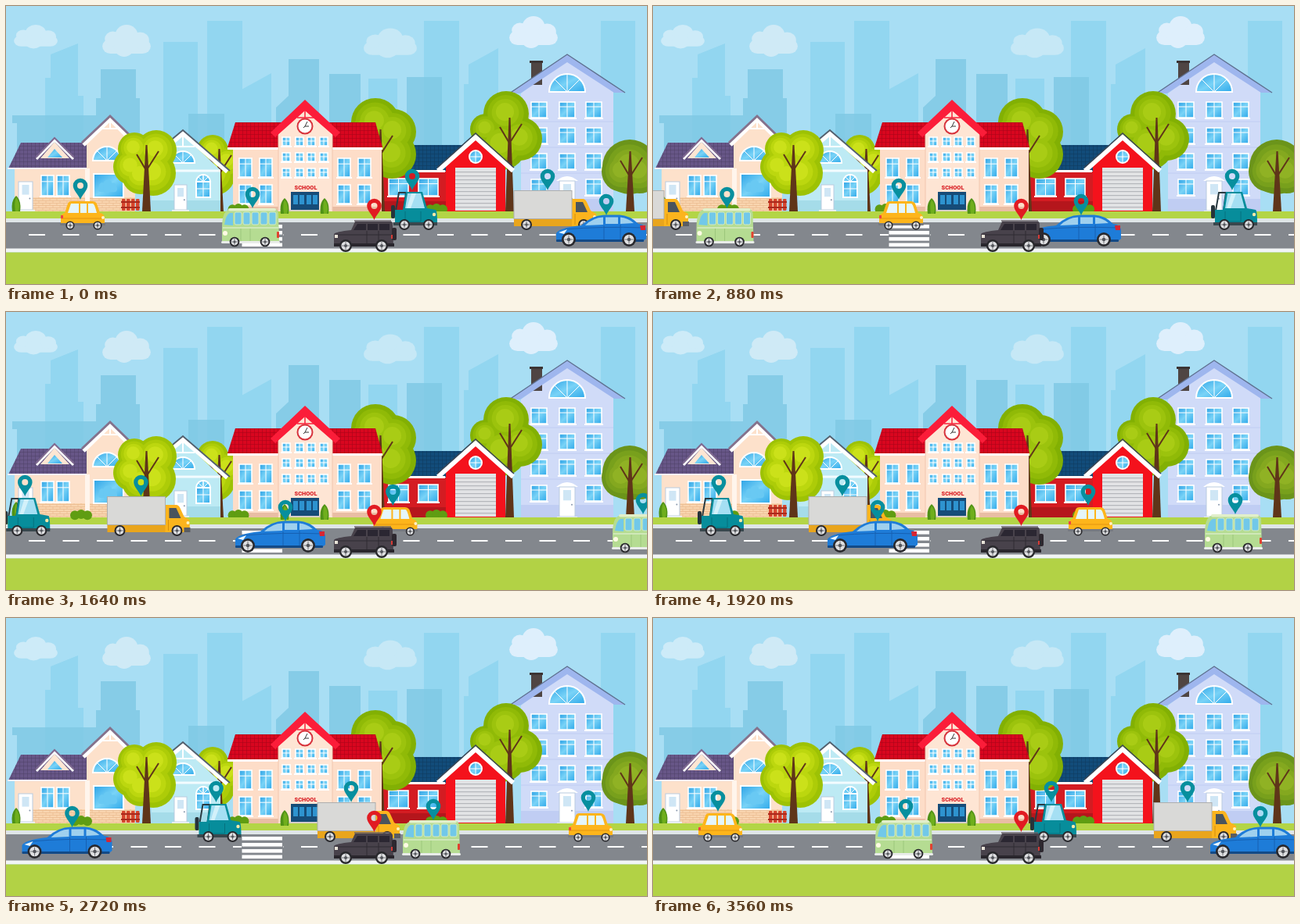
Recreate the animation shown at these times as an HTML page. Size 819 by 356 pixels, loop 3600 ms.

```html
<!DOCTYPE html>
<html lang="en">
<head>
<meta charset="utf-8">
<title>Town street</title>
<style>
html, body { margin: 0; width: 100%; height: 100%; overflow: hidden; background: #a8ddf3 }
svg { display: block; width: 819px; height: 356px }
text { font: 900 7.4px Roboto, sans-serif }
</style>
</head>
<body>
<svg id="stage" viewBox="0 0 819 356">
<defs>
  <linearGradient id="glass" x2="1" y2="1"><stop stop-color="#2ea3e6"/><stop offset=".5" stop-color="#79d3f7"/><stop offset="1" stop-color="#2fa9ea"/></linearGradient>
  <pattern id="tiles" width="5" height="5" patternUnits="userSpaceOnUse"><path d="M0 4.5H5M2.5 0V4.5" stroke="#000" stroke-opacity=".13" fill="none"/></pattern>
  <pattern id="bricks" width="9" height="6" patternUnits="userSpaceOnUse"><path d="M0 .5H9M0 3.5H9M2 0V3M6 3V6" stroke="#e9b98c" stroke-width=".7" fill="none"/></pattern>
</defs>
</svg>
<script>
const stage = document.getElementById('stage');

const rect = (x, y, w, h, fill, more = '') => `<rect x="${x}" y="${y}" width="${w}" height="${h}" fill="${fill}" ${more}/>`;
const path = (d, fill, more = '') => `<path d="${d}" fill="${fill}" ${more}/>`;
const line = (d, color, width = 1, more = '') => path(d, 'none', `stroke="${color}" stroke-width="${width}" ${more}`);
const ball = (x, y, r, fill, ry = r) => `<ellipse cx="${x}" cy="${y}" rx="${r}" ry="${ry}" fill="${fill}"/>`;
const grid = (xs, ys, draw) => ys.map(y => xs.map(x => draw(x, y)).join('')).join('');

// Window with a white frame, a middle bar and a sill
const pane = (x, y, w, h, bar = .3) =>
  rect(x, y, w, h, 'url(#glass)', 'stroke="#fff" stroke-width="1.6"') +
  line(`M${x + w / 2} ${y}v${h}M${x} ${y + h * bar}h${w}`, '#fff') +
  rect(x - 2, y + h, w + 4, 2, '#fff');
const arch = (x, y, r) =>
  path(`M${x - r} ${y}a${r} ${r} 0 0 1 ${2 * r} 0z`, 'url(#glass)', 'stroke="#fff" stroke-width="2"') +
  line(`M${x} ${y - r}v${r}M${x} ${y}l${-r * .7} ${-r * .7}M${x} ${y}l${r * .7} ${-r * .7}`, '#fff');
const door = (x, y, w, h) =>
  rect(x, y, w, h, '#fff', 'stroke="#b9cbe0"') + rect(x + w * .25, y + 4, w * .5, h * .35, '#cfe6f5') +
  ball(x + w * .8, y + h * .6, 1, '#8797ad') + rect(x - 3, y + h, w + 6, 2, '#e9eef3');

const cloud = (x, y, sx, sy, fill) => `<g transform="translate(${x} ${y}) scale(${sx} ${sy})" fill="${fill}">
  <rect x="-30" y="-2" width="60" height="20" rx="10"/><circle cx="-17" cy="-2" r="10"/>
  <circle cx="0" cy="-7" r="14"/><circle cx="17" cy="0" r="11"/><circle cx="-3" cy="10" r="12"/></g>`;

// Crown of merging lobes, shaded from the rim inwards
const lime = ['#9dc204', '#adcc08', '#bcd70f', '#cbe11a'];
const leaf = ['#82b003', '#90ba07', '#9cc30d', '#a9cc15'];
const olive = ['#6b941a', '#78a01c', '#84a81f', '#90b224'];
const tree = (lobes, shades, trunk, fork) =>
  shades.map((shade, i) => lobes.map(([x, y, r]) => ball(x - i * .5, y - i * .8, r * (1 - i * .2), shade)).join('')).join('') +
  path(`M${trunk - 6} 263L${trunk - 1.5} ${fork - 22}h2L${trunk + 5} 263z`, '#5f3519') +
  line(`M${trunk} ${fork + 12}L${trunk - 13} ${fork - 10}M${trunk + 1} ${fork + 8}L${trunk + 15} ${fork - 14}`, '#5f3519', 2);
const bush = (x, w, y = 263) => [-.32, 0, .32].map(k => ball(x + k * w, y - 4 + Math.abs(k) * 4, w * .24, '#5f9d12', 6)).join('');
const shrub = (x, y) => path(`M${x - 5} ${y}q-2 -14 5 -20q7 6 5 20z`, '#4f9216') + path(`M${x - 1} ${y}q-2 -12 1 -18q6 7 3 18z`, '#6fae1d');

const backdrop = () =>
  rect(0, 0, 819, 265, '#a8def4') +
  path('M57 62L92 48V115H99V220H50V92H57zM201 46h44v180h-44zM257 19h45v200h-45zM290 113L339 86V220H290zM463 93h37v120h-37zM534 19h45v190h-45zM591 75L629 54V220H585V100H591zM760 19h44v200h-44z', '#92d6f0') +
  path('M8 140H123V150H117V220H14V150H8zM121 81h45v37h5v100h-56V118h6zM233 138h46v80h-46zM361 68h39v150h-55V130L361 115zM413 87h40v130h-40zM512 91h45v120h-45z', '#7fc9e4', 'opacity=".8"') +
  cloud(38, 39, .93, .71, '#cdebf8') + cloud(154, 44, 1.03, .95, '#cfeaf6') + cloud(491, 47, 1.13, .88, '#c6e8f6') + cloud(674, 33, 1.03, .95, '#deeffc');

const cottage = () =>
  rect(11, 207, 92, 56, '#fde1cb') + rect(11, 245, 154, 18, '#f9d5b0') + rect(11, 245, 154, 18, 'url(#bricks)') +
  path('M19 175H130L106 208H3z', '#675687') + path('M19 175H130L106 208H3z', 'url(#tiles)') + line('M2 208H106', '#f4eef4', 2) +
  path('M44 195L62 174L81 195z', '#fde6d3') + path('M53 194L62 183L72 194z', 'url(#glass)') +
  line('M39 196L62 172L86 196', '#fff', 3) + line('M38 194L62 169L87 194', '#806a91', 2) +
  path('M103 175L133 145L165 178V245H103z', '#fde1cb') +
  line('M99 178L133 145L168 180', '#fff', 5) + line('M97 175L133 141L170 177', '#85728c', 3) +
  line('M121 157H145M133 145V157', '#fff', 2) + arch(129, 198, 18) +
  rect(112, 215, 38, 30, 'url(#glass)', 'stroke="#fff" stroke-width="2"') + cloud(130, 231, .4, .4, '#69c9f3') +
  rect(101, 208, 6, 54, '#fff5ec') + door(16, 225, 18, 36) + pane(45, 217, 16, 26) + pane(65, 217, 16, 26) + shrub(13, 263) +
  grid([148, 154, 160, 166], [247], (x, y) => rect(x, y, 4.5, 15, '#d6452d', 'rx="1"')) + line('M147 251H171M147 258H171', '#a92a1d', 2);

const blueHouse = () =>
  path('M186 195L226 165L274 210V263H186z', '#bdeaf4') + rect(186, 249, 88, 14, '#a5dce9') +
  line('M178 204L226 163L283 212', '#fff', 6) + line('M178 199L226 159L286 211', '#53606e', 2) +
  line('M209 180H241M226 165V180', '#fff', 2) + arch(226, 201, 15) + line('M186 211H274', '#f3fcff', 3) + door(215, 229, 16, 32) +
  rect(243, 225, 18, 20, 'url(#glass)', 'stroke="#fff" stroke-width="2"') + arch(252, 225, 9) + line('M252 217v28M243 234h18', '#fff');

const school = () =>
  rect(290, 183, 190, 80, '#fdddc8') + rect(290, 257, 190, 6, '#e9bda4') +
  path('M293 149H472L481 181H283z', '#d9061f') + path('M293 149H472L481 181H283z', 'url(#tiles)') + rect(283, 181, 198, 3, '#fff') +
  path('M348 163L382 130L417 163V263H348z', '#fee5d4') + line('M348 165V262M417 165V262', '#f1c6ae') +
  path('M382 120L427 162L421 168L382 134L344 168L338 162z', '#fb1d39') + line('M372 143H393M382 134V143', '#fb1d39', 1.5) +
  ball(382, 154, 10.5, '#d7333c') + ball(382, 154, 8.5, '#fff') + line('M385 148L382 154H387M382 154L380 156', '#333') +
  grid([353, 370, 385, 401], [168, 188, 208], (x, y) => pane(x, y, 10, 11, .45)) +
  grid([298, 324, 424, 450], [195, 229], (x, y) => pane(x, y, 16, 24)) +
  '<text x="383" y="235" text-anchor="middle" fill="#d91e24">SCHOOL</text>' +
  rect(364, 238, 36, 24, '#164c78') + grid([367, 375, 384, 392], [242], (x, y) => rect(x, y, 6, 12, '#2e93cf')) + rect(361, 261, 42, 2, '#d8cfca') + bush(297, 24);

const flats = () =>
  path('M658 112L717 66L776 110V263H658z', '#d0dbf8') + rect(658, 247, 118, 16, '#c0cdf3') + rect(671, 73, 14, 28, '#4f4543') + rect(669, 70, 17, 3, '#3b3433') +
  path('M717 62L790 111H777L717 72L657 112H643z', '#9eb6ee') + line('M643 112L717 62L791 111', '#5f7190', 1.4) +
  arch(717, 110, 23) + line('M658 148H776M658 181H776M658 214H776', '#c0cdf2') +
  grid([671, 707, 741], [123, 156, 189], (x, y) => pane(x, y, 20, 20)) + pane(671, 222, 20, 20) + pane(741, 222, 20, 20) +
  path('M703 224Q717 212 731 224z', '#fff') + door(707, 224, 20, 38);

const fireHouse = () =>
  rect(482, 212, 82, 51, '#d41c22') + rect(482, 250, 82, 13, '#b5161c') +
  path('M498 178H592L563 211H481z', '#124c7a') + path('M498 178H592L563 211H481z', 'url(#tiles)') + rect(481, 210, 80, 3, '#fff') +
  pane(489, 221, 25, 22) + pane(527, 221, 25, 22);
const garage = () =>
  path('M562 202L600 167L638 202V263H562z', '#f4121c') + line('M552 211L600 168L648 211', '#fff', 6) + line('M551 207L600 163L649 207', '#3b4654', 1.6) +
  ball(600, 193, 9, '#fff') + ball(600, 193, 7, 'url(#glass)') + line('M600 186v14M593 193h14', '#fff') +
  rect(574, 207, 52, 55, '#e2e3e5') + grid([574], [212, 217, 222, 227, 232, 237, 242, 247, 252, 257], (x, y) => rect(x, y, 52, 1.2, '#b4b6bb')) + bush(550, 25);

const road = () =>
  rect(0, 263, 819, 10, '#b3d546') + rect(0, 272, 819, 5, '#dfe5e8') + rect(0, 277, 819, 34, '#83878d') +
  line('M29 293H819', '#fff', 1.8, 'stroke-dasharray="21 22.5"') + rect(301, 278, 53, 32, '#83878d') +
  grid([301.5], [280, 288, 296, 303.5], (x, y) => rect(x, y, 51.5, 4.6, '#fff')) +
  rect(0, 310.5, 819, 5, '#f1f4f5') + rect(0, 315.5, 819, 41, '#b2d245') + bush(96, 25) + shrub(356, 266) + shrub(407, 266);

const wheel = (x, y, r) => ball(x, y, r, '#29292d') + ball(x, y, r * .7, '#dfe0e2') + ball(x, y, r * .25, '#54565c') +
  line(`M${x - r * .6} ${y}h${r * 1.2}M${x} ${y - r * .6}v${r * 1.2}`, '#54565c', .8);
const pin = (x, y, fill = '#078f9e') =>
  path(`M${x} ${y + 18}C${x - 2} ${y + 12} ${x - 9.3} ${y + 6} ${x - 9.3} ${y}a9.3 9.3 0 0 1 18.6 0C${x + 9.3} ${y + 6} ${x + 2} ${y + 12} ${x} ${y + 18}zM${x - 4} ${y}a4 4 0 1 0 8 0a4 4 0 1 0 -8 0z`, fill, 'fill-rule="evenodd"');

const taxi = () =>
  path('M70 281V272Q70 266 75 265L79 253Q80 250 84 250H110Q114 250 116 253L120 265Q126 266 126 272V281z', '#fdb51b') +
  path('M79 265L83 253H93V265zM95 253H103V265H95zM105 253H111Q113 253 116 265H105z', '#e5f6fb') +
  line('M71 272H126', '#e49510') + rect(69, 278, 58, 3, '#777a80', 'rx="1"') + rect(70, 268, 3, 4, '#e44') + ball(124, 271, 2, '#fff3c4') +
  wheel(82, 281, 5.6) + wheel(117, 281, 5.6) + pin(95, 230);

const truck = () =>
  rect(649, 272, 105, 10, '#e9a51c') + path('M723 247H737Q740 247 742 251L747 262L754 266V282H723z', '#fbb41d') +
  path('M728 251H737L743 264H728z', '#4a545d') + rect(649, 236.5, 74, 36, '#d9d9d7', 'stroke="#adaeae"') +
  rect(747, 276, 8, 6, '#5a5d62') + ball(752, 270, 2, '#fff4bf') + line('M727 266V280', '#d58e0d') + wheel(665, 280, 7) + wheel(738, 280, 7) + pin(692, 218);

const jeep = () =>
  rect(492, 255, 5, 17, '#26343a', 'rx="2"') + line('M498 262L502 239H511L508 262', '#2a3b42', 2) +
  path('M497 280V261H507L511 238H532L538 259L549 261Q551 262 551 279z', '#078d9b') +
  path('M513 240H530L535 259H510z', '#a5dff3') + path('M518 240h6l-7 19h-5z', '#d3f1fa') +
  line('M510 263V276H530V263', '#06717e') + rect(495, 277, 56, 4, '#39474d') + ball(547, 267, 2.2, '#f9e9a6') +
  wheel(509, 280, 7) + wheel(540, 280, 7) + pin(519, 218);

const bus = () =>
  path('M276 303V284Q276 264 284 261Q287 259 294 259H340Q347 259 348 265L349 303z', '#b5dc92') + rect(284, 259, 61, 3.5, '#e2efca', 'rx="2"') +
  path('M279 280Q281 267 286 265H290V281z', '#71c8e9') +
  grid([292, 303, 314, 325, 336], [264], (x, y) => rect(x, y, 9, 16, '#71c8e9', 'rx="2" stroke="#d5ebc0"')) +
  line('M277 284H348', '#d9ecc4', 1.5) + line('M300 285V303M312 285V303', '#9cc77c') + ball(280, 291, 3, '#fffbe4') + rect(346, 289, 3, 8, '#e2412f', 'rx="1"') +
  rect(275, 301, 75, 3, '#e9ece9', 'rx="1.5"') + wheel(292, 302, 6.3) + wheel(331, 302, 6.3) + pin(315, 241);

const sedan = () =>
  path('M703 300V291Q707 284 735 281Q748 268 766 267.5H784Q797 268 808 279Q817 280 818 286V298L813 302H707z', '#1e7cd8') +
  path('M740 281Q750 271 763 270.5V280zM766 270.5H782V279H766zM785 270.5Q794 271 802 278L785 279z', '#9fd0ee') +
  line('M714 286Q760 282 816 284M764 281V300M785 280V299', '#1660b2') + rect(703, 299, 112, 3, '#134a87', 'rx="1"') +
  path('M706 290L717 286L713 292z', '#e8f6ff') + path('M810 281H817V287H811z', '#d82532') + wheel(719, 299, 9) + wheel(796, 299, 9) + pin(767, 250);

const suv = () =>
  path('M419 307V292Q421 289 441 287L446 276H492Q494 276 494 281L495 307z', '#48424b') + rect(493, 284, 6, 16, '#2d282f', 'rx="2"') +
  path('M444 287L449 279H460V287zM462 279H475V287H462zM477 279H490V287H477z', '#2b2732') +
  line('M422 293H494M461 288V304M476 288V304', '#2f2a32') + rect(419, 304, 77, 4, '#29262c') + rect(420, 293, 4, 4, '#e8e3d8') + rect(492, 293, 2, 5, '#d63b36') +
  line('M445 275H492', '#6a636b', 1.5) + wheel(434, 307, 8) + wheel(480, 307, 8) + pin(470.5, 256, '#e11b22');

// Pin positions along an unrolled road; each vehicle repeats every `span` pixels
const times = [0, 480, 1320, 1920, 2440, 3000, 3560, 3600];
const fleet = [
  { draw: taxi, span: 880, xs: [95, 214, 424, 556, 670, 818, 963, 975] },
  { draw: truck, span: 929, xs: [692, 812, 1022, 1171, 1300, 1440, 1612, 1621] },
  { draw: jeep, span: 894, xs: [519, 640, 850, 978, 1092, 1233, 1403, 1413] },
  { draw: bus, span: 910, xs: [315, 195, -16, -166, -294, -434, -587, -595] },
  { draw: sedan, span: 902, xs: [767, 647, 437, 287, 155, 14, -126, -135] }
];

stage.insertAdjacentHTML('beforeend',
  backdrop() + tree([[264, 185, 20], [283, 200, 21], [265, 215, 28]], lime, 273, 205) +
  cottage() + blueHouse() + tree([[164, 183, 21], [192, 185, 26], [160, 206, 23], [188, 214, 29], [172, 217, 24]], lime, 180, 200) +
  fireHouse() + tree([[472, 149, 31], [462, 160, 24], [495, 161, 29], [493, 190, 31], [475, 185, 29]], leaf, 479, 180) + school() +
  flats() + tree([[639, 138, 29], [613, 158, 20], [657, 170, 28], [633, 178, 32]], leaf, 644, 165) + garage() +
  tree([[797, 206, 35], [787, 212, 26], [809, 212, 28]], olive, 798, 208) + road() +
  fleet.map(v => `<g class="car">${v.draw()}</g><g class="car">${v.draw()}</g>`).join('') + suv());

const cars = stage.querySelectorAll('.car');

function positionAt(xs, t) {
  const i = times.findIndex(end => end > t) - 1;
  return xs[i] + (xs[i + 1] - xs[i]) * (t - times[i]) / (times[i + 1] - times[i]);
}

function frame() {
  const t = Math.floor(performance.now() % 3600 / 40) * 40;
  fleet.forEach(({ xs, span }, i) => {
    const x = (positionAt(xs, t) % span + span) % span - xs[0];
    cars[2 * i].setAttribute('transform', `translate(${x})`);
    cars[2 * i + 1].setAttribute('transform', `translate(${x - span})`);
  });
  requestAnimationFrame(frame);
}
frame();
</script>
</body>
</html>
```
